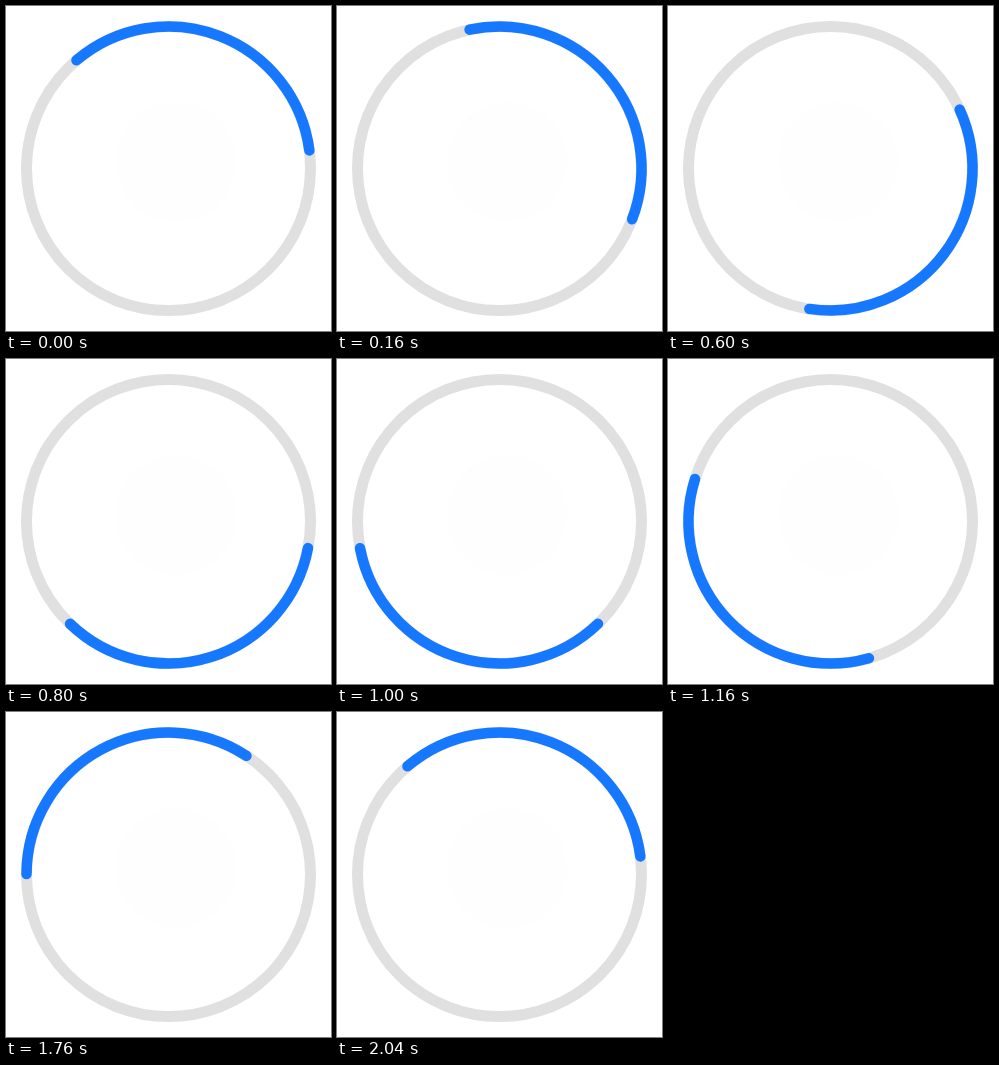
Recreate the animation shown at these times as an HTML page. Size 325 by 325 pixels, loop 2080 ms.

```html
<!DOCTYPE html>
<html lang="en">
<head>
<meta charset="utf-8">
<title>Loading ring</title>
<style>
  html, body { margin: 0; width: 100%; height: 100%; overflow: hidden; background: #fff; }
  svg { display: block; width: 100vw; height: 100vh; }
</style>
</head>
<body>
<svg viewBox="0 0 325 325">
  <circle cx="170" cy="156" r="60" fill="#fefefe"/>
  <g fill="none" transform="translate(162.5 162.5)">
    <circle r="142" stroke="#e0e0e0" stroke-width="11"/>
    <path id="arc" stroke="#1677ff" stroke-width="10.5" stroke-linecap="round"/>
  </g>
</svg>
<script>
  const LOOP = 2080, STEP = 40, TURN_STEPS = 51;
  const RADIUS = 142, START = -40.4, SPAN = 123.1;
  const arc = document.getElementById('arc');

  // Degrees run clockwise from the top.
  function point(degrees) {
    const a = degrees * Math.PI / 180;
    return `${RADIUS * Math.sin(a)} ${-RADIUS * Math.cos(a)}`;
  }

  arc.setAttribute('d', `M${point(START)} A${RADIUS} ${RADIUS} 0 0 1 ${point(START + SPAN)}`);

  // The last step completes the turn, so the loop rests there for two steps.
  function render(time) {
    const step = Math.floor((time % LOOP) / STEP);
    arc.setAttribute('transform', `rotate(${360 * step / TURN_STEPS})`);
  }

  const begin = performance.now();
  function tick() {
    render(performance.now() - begin);
    requestAnimationFrame(tick);
  }
  tick();
</script>
</body>
</html>
```
